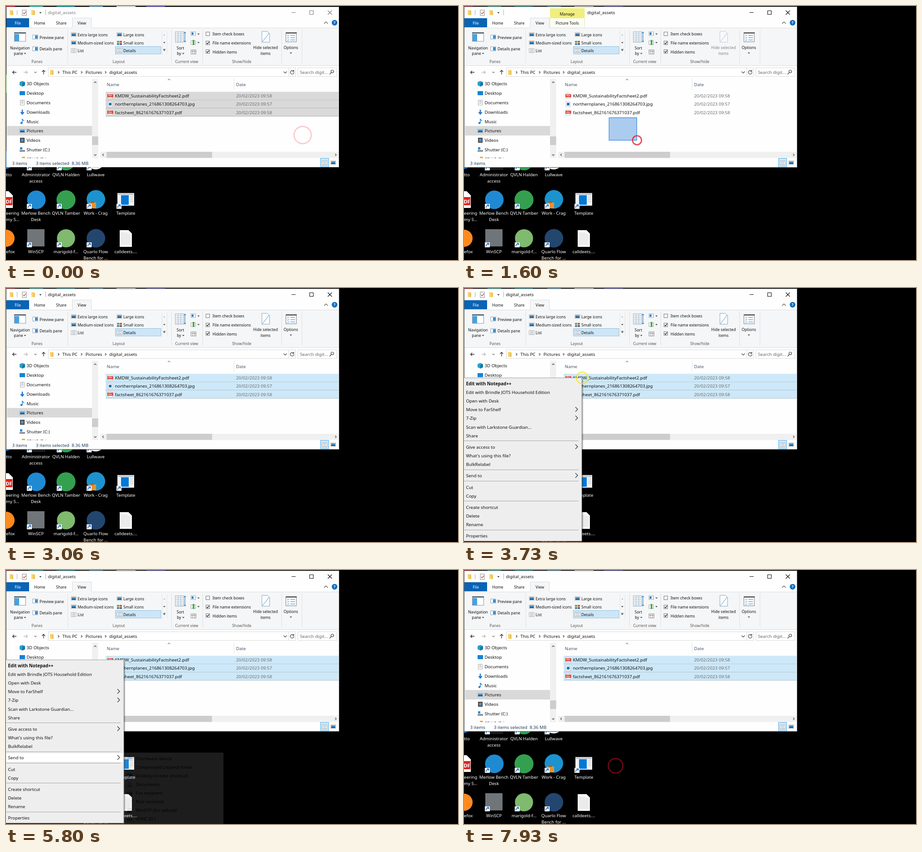
Animation of 998x561 px, one loop 8 s. Source, as an HTML page:

```html
<!DOCTYPE html>
<html lang="en">
<head>
<meta charset="utf-8">
<title>File manager</title>
<style>
html, body { margin: 0; width: 100%; height: 100%; overflow: hidden; background: #000; }
svg { display: block; width: 998px; height: 561px; font-family: "Noto Sans", "Open Sans", sans-serif; }
text { white-space: pre; }
</style>
</head>
<body>
<svg id="stage" viewBox="0 0 998 561" xmlns="http://www.w3.org/2000/svg"></svg>
<script>
const BODY = 9.75, SMALL = 8.6;
const INK = '#111', BLUE = '#0078d7', FOLDER = '#f8d775';

// Markup helpers
const rect = (x, y, w, h, fill, more = '') =>
  `<rect x="${x}" y="${y}" width="${w}" height="${h}" fill="${fill}" ${more}/>`;
const disc = (x, y, r, fill, more = '') => `<circle cx="${x}" cy="${y}" r="${r}" fill="${fill}" ${more}/>`;
const line = (d, stroke = '#555', w = 1) => `<path d="${d}" fill="none" stroke="${stroke}" stroke-width="${w}"/>`;
const shape = (d, fill) => `<path d="${d}" fill="${fill}"/>`;
const text = (x, y, s, size = BODY, fill = INK, more = '') =>
  `<text x="${x}" y="${y}" font-size="${size}" fill="${fill}" ${more}>${s}</text>`;
const mid = (x, y, s, size = BODY, fill = INK, more = '') =>
  text(x, y, s, size, fill, 'text-anchor="middle" ' + more);
const group = (id, s) => `<g id="${id}">${s}</g>`;
const caret = (x, y, fill = '#444') => shape(`M${x - 2.5} ${y - 1.2}h5l-2.5 2.8z`, fill);
const chevron = (x, y, dx, dy, c = '#444', w = 1.2) => dx
  ? line(`M${x - dx / 2} ${y - Math.abs(dx)}l${dx} ${Math.abs(dx)}l${-dx} ${Math.abs(dx)}`, c, w)
  : line(`M${x - Math.abs(dy)} ${y - dy / 2}l${Math.abs(dy)} ${dy}l${Math.abs(dy)} ${-dy}`, c, w);
const folder = (x, y, h = 11) => rect(x, y, 6, h, FOLDER) + rect(x + 4, y + 1.5, 4, h - 1.5, '#eec35a');
const picture = (x, y, w = 11, h = 8) => rect(x, y, w, h, '#fff', 'stroke="#999" stroke-width=".8"') +
  rect(x + 1, y + 1, w - 2, h / 2, '#4d9bdb') + rect(x + 1, y + h / 2, w - 2, h / 2 - 1, '#2d5a78');
const listing = (x, y, w = 11, h = 9) => rect(x, y, w, h, '#fff', 'stroke="#999" stroke-width=".8"') +
  [2, 4.5, 7].map(d => line(`M${x + 2} ${y + d}h${w - 4}`, '#7b8ea0', .8)).join('');
const page = (x, y, w, h, c = '#fff') =>
  shape(`M${x} ${y}h${w * .72}l${w * .28} ${w * .28}v${h - w * .28}h${-w}z`, c);

function desktop() {
  const arrow = (x, y) => rect(x, y, 11, 11, '#fff') +
    line(`M${x + 2.5} ${y + 9}q0 -5 5 -5M${x + 4.5} ${y + 2}h3.8v4`, '#1c63b8', 1.6);
  const label = (x, y, ...rows) => rows.map((s, i) => mid(x, y + 14 * i, s, 9.65, '#fff')).join('');
  const cutLabel = (y, ...rows) => rows.map((s, i) => text(0, y + 14 * i, s, 9.65, '#fff')).join('');
  return rect(0, 0, 998, 561, '#000') +
    rect(0, 0, 20, 2, '#b3202a') + rect(52, 0, 30, 2, '#2aa79b') + rect(112, 0, 40, 2, '#087f8c') +
    rect(184, 0, 30, 2, '#4c8fb5') + rect(244, 0, 42, 2, '#ddd') + rect(310, 0, 41, 2, '#4a44b0') +
    rect(0, 152, 1, 40, '#53b52f') + rect(0, 320, 1, 40, '#1c7fd0') +
    disc(0, 345, 15, '#1477c9') + rect(46, 330, 41, 32, '#1c1e22') + disc(132.5, 343, 20, '#34a04f') +
    disc(198, 341, 20, '#eee') + [46, 112, 178].map(x => arrow(x, 352)).join('') +
    cutLabel(376, 'tto') + label(66, 376, 'Administrator', 'access') + label(132.5, 376, 'QVLN Halden') +
    label(198, 376, 'Lullwave') +
    page(-18, 409, 33, 37) + rect(-18, 422, 32, 18, '#e2231a') +
    text(-7.5, 436, 'PDF', 11, '#fff', 'font-weight="700"') + cutLabel(461, 'eering', 'my S...') +
    disc(67, 428, 20.5, '#1f8ad2') + disc(132.5, 428, 21, '#34a04f') + disc(198.5, 427, 20.5, '#1c93cf') +
    rect(183, 434, 16, 13, '#e8912d') + rect(187, 432, 7, 3, '#a85d14') +
    rect(246, 413, 37, 28, '#f3f3f3') + rect(247, 414, 35, 3, '#b7c3cf') + rect(254, 418, 17, 21, BLUE) +
    [420, 424, 428, 432].map(y => line(`M274 ${y}h7`, '#aaa', .8)).join('') +
    [46, 112, 178, 244].map(x => arrow(x, 437)).join('') +
    label(66, 461, 'Merlow Bench', 'Desk') + label(132.5, 461, 'QVLN Tamber') +
    label(198, 461, 'Work - Crag') + label(264.5, 461, 'Template') +
    disc(0, 513, 19, '#ff8a1e') + cutLabel(546, 'efox') +
    rect(47, 493, 38, 38, '#70757a') + disc(132.5, 513, 20, '#7fba6f') + disc(198.5, 513, 20.5, '#23466f') +
    page(251, 495, 27, 37, '#f6f6f6') +
    Array.from({ length: 9 }, (_, i) => line(`M254 ${502 + i * 3}h${i ? 21 : 14}`, '#ccc', .8)).join('') +
    [46, 112, 178].map(x => arrow(x, 522)).join('') +
    label(66, 546, 'WinSCP') + label(132.5, 546, 'marigold-f...') +
    label(198, 546, 'Quarlo Flow', 'Bench for ...') + label(264.5, 546, 'calldeets....');
}

function titleBar() {
  return folder(8, 9) + line('M24.5 9v11M87.5 8v12', '#aaa') +
    rect(36, 9, 9, 12, '#fff', 'stroke="#888"') + line('M38 15l2 2.5l4 -5', '#d2472b', 1.4) +
    folder(56, 9) + caret(76, 15, '#222') +
    group('manage', rect(190, 5, 76.5, 22, '#f0ee7c') + rect(190, 27, 76.5, 21, '#fdfdf6') +
      line('M190 27v21M266.5 27v21', '#e3e3c8') + mid(228, 20.5, 'Manage', SMALL) +
      mid(228, 41, 'Picture Tools', SMALL)) +
    group('title', text(0, 18, 'digital_assets')) +
    group('buttons', line('M630.5 14.5h9M670.5 10.5h8v8h-8zM710.5 10l9 9M719.5 10l-9 9', '#111', 1.1)) +
    rect(1, 27, 50, 20, '#0a63b5') + mid(26, 40.5, 'File', SMALL, '#fff') +
    mid(74.5, 41, 'Home', SMALL) + mid(122, 41, 'Share', SMALL) +
    rect(146.5, 26.5, 42, 23, '#f5f6f7', 'stroke="#dadbdc"') + mid(167.5, 41, 'View', SMALL) +
    chevron(706.5, 37, 0, -4, '#555') + disc(725.5, 37, 6.2, '#0f6cbf') +
    mid(725.5, 40.3, '?', 9, '#fff', 'font-weight="700"');
}

function ribbon() {
  const item = (x, y, s) => text(x, y, s, SMALL);
  const box = (y, on) => rect(441.5, y, 8, 8, '#fff', 'stroke="#666" stroke-width=".9"') +
    (on ? line(`M443 ${y + 4}l2 2.2l3.5 -4.5`, '#111', 1.3) : '');
  const pane = y => rect(59, y, 11, 9, '#fff', 'stroke="#8ba0b5"') + rect(64, y + 1, 6, 7, '#3d8fd1');
  const cap = (x, s) => mid(x, 125.5, s, SMALL, '#555');
  return rect(1, 48, 734, 83, '#f5f6f7') + line('M1 48.5h145M189 48.5h546M1 131.5h734', '#dadbdc') +
    line('M136.5 52v75M365.5 52v75M434.5 52v75M608.5 52v75M653.5 52v75', '#dfe0e1') +
    rect(18.5, 59, 25, 19, '#fff', 'stroke="#8b97a3"') + rect(19, 62, 10, 16, '#4aa0dc') +
    rect(18, 58, 26, 3, '#5d6b79') +
    mid(31, 95.5, 'Navigation', SMALL) + mid(27.5, 108, 'pane', SMALL) + caret(42, 105) +
    pane(64) + pane(90) + item(74, 72.5, 'Preview pane') + item(74, 98, 'Details pane') +
    rect(241.5, 89.5, 100.5, 16.5, '#cde6f7', 'stroke="#92c0e0"') +
    picture(144, 59) + picture(144, 77) + listing(144, 94) +
    picture(245, 59) + rect(245, 77, 5, 4, '#67a55a') + rect(251, 77, 5, 4, '#cf594a') +
    rect(245, 82, 5, 4, '#4384c4') + rect(251, 82, 5, 4, '#666') + listing(245, 93.5) +
    item(158, 67, 'Extra large icons') + item(158, 84.5, 'Medium-sized icons') + item(158, 101.5, 'List') +
    item(259, 67, 'Large icons') + item(259, 84.5, 'Small icons') + item(259, 101.5, 'Details') +
    line('M344.5 55v52M355.5 55v52', '#e2e3e4') + shape('M347.5 65h4l-2 -2.5z', '#aaa') +
    caret(349.5, 81) + caret(349.5, 98) + line('M347 95.5h5', '#444') +
    rect(374, 57, 18, 23, '#fff', 'stroke="#8fa5b8"') +
    [61, 65, 69, 73, 77].map(y => line(`M375 ${y}h16`, '#9bb3c6')).join('') +
    line('M380 57v23M386 57v23', '#9bb3c6') +
    line('M395 58v21M393 60l2 -2.5l2 2.5M393 77l2 2.5l2 -2.5', '#2779c0', 1.2) +
    mid(385, 95.5, 'Sort', SMALL) + mid(382, 108, 'by', SMALL) + caret(391.5, 105) +
    rect(408.5, 57, 10, 8, '#fff', 'stroke="#8fa5b8"') + rect(410, 58.5, 4, 5, '#2779c0') + caret(425, 62) +
    rect(408.5, 77, 10, 8, '#fff', 'stroke="#8fa5b8"') + rect(412, 75, 4, 11, '#56ab48') + caret(425, 81) +
    rect(408.5, 97, 11, 9, '#fff', 'stroke="#888"') + line('M408 100.5h12M412.5 97v9M416.5 97v9', '#888') +
    box(57.5) + box(77.5, 1) + box(96.5, 1) + item(456, 65, 'Item check boxes') +
    item(456, 85, 'File name extensions') + item(456, 104.5, 'Hidden items') +
    group('hide', page(565, 56, 17, 24, '#fbfcfd') + line('M565 56h12l5 5v19h-17z', '#8ba0b5') +
      line('M566 79l15 -19', '#4a93cc') + mid(573, 95, 'Hide selected', SMALL) + mid(573, 107.5, 'items', SMALL)) +
    rect(618, 59, 23, 20, '#fff', 'stroke="#777"') + rect(618, 58, 24, 3, '#666') +
    [65, 70, 75].map(y => line(`M621 ${y}l1.5 1.5l2.5 -3M628 ${y}h10`, '#2779c0')).join('') +
    mid(629, 95, 'Options', SMALL) + caret(629, 104) +
    cap(68.5, 'Panes') + cap(249, 'Layout') + cap(399, 'Current view') + cap(520.5, 'Show/hide');
}

function addressBar() {
  return line('M23 146.5h-8.5M18 143l-3.5 3.5l3.5 3.5', '#333', 1.3) +
    line('M39 146.5h8.5M44 143l3.5 3.5l-3.5 3.5', '#bbb', 1.3) + chevron(65, 146.5, 0, 2.5, '#777') +
    line('M83 151v-9M79.5 145.5l3.5 -3.5l3.5 3.5', '#333', 1.3) +
    rect(93.5, 136.5, 546, 19, '#fff', 'stroke="#d9d9d9"') + rect(644.5, 136.5, 86, 19, '#fff', 'stroke="#d9d9d9"') +
    folder(97, 141) + [116, 167, 220].map(x => chevron(x, 146.5, 2.5, 0)).join('') +
    text(124.5, 150, 'This PC') + text(175.5, 150, 'Pictures') + text(228, 150, 'digital_assets') +
    chevron(616.5, 146.5, 0, 3.5) + line('M624.5 137v18', '#d9d9d9') +
    line('M634.5 143.5a4 4 0 1 0 1.3 2.5M635.5 141v3.5h-3.5', '#444', 1.2) +
    text(649, 150, 'Search digit...', BODY, '#666') +
    disc(720.5, 144.5, 3, 'none', 'stroke="#444" stroke-width="1.2"') + line('M718 147l-3.5 4', '#444', 1.4);
}

function sidebar() {
  const names = ['3D Objects', 'Desktop', 'Documents', 'Downloads', 'Music', 'Pictures', 'Videos', 'Shutter (C:)', 'SDHC (D:)'];
  const icons = [
    shape('M30 168l6 -2.5l6 2.5v7l-6 3l-6 -3z', '#2d9fc7') + shape('M36 170l6 -2v7l-6 3z', '#1577a8'),
    rect(30, 188, 12, 9, '#1583d6'), listing(31.5, 208, 9, 11),
    line('M36 229v9M32.5 234.5l3.5 4l3.5 -4', '#2477cf', 2.6),
    disc(34, 258.5, 2.2, '#1c7ed0') + line('M36 259v-9l4 4', '#1c7ed0', 1.5),
    picture(30, 272, 12, 8), rect(31, 291, 10, 11, '#444') + rect(33, 293, 6, 7, '#4b8ec9'),
    rect(30, 318, 12, 4, '#8a9299') + rect(31, 312, 5, 5, '#1b8fdc'), rect(35, 333, 7, 6, '#e5ae37')];
  return '<clipPath id="pane"><rect x="1" y="160" width="189" height="176"/></clipPath><g clip-path="url(#pane)">' +
    rect(2, 265, 188, 21, '#d9d9d9') +
    names.map((s, i) => icons[i] + text(45.5, 175.2 + 20.85 * i, s)).join('') + '</g>' +
    rect(190, 161, 13.5, 175, '#f0f0f0') + rect(190, 288, 13.5, 19, '#cdcdcd') +
    chevron(197, 168.5, 0, -2.5) + chevron(197, 329, 0, 2.5);
}

const FILES = [
  ['KMDW_SustainabilityFactsheet2.pdf', '09:58'],
  ['northernplanes_216861308264703.jpg', '09:57'],
  ['factsheet_862161676371037.pdf', '09:58']];
const rowTop = i => 189.5 + 18.2 * i;

function fileList() {
  const head = '#44566c';
  return text(222.5, 176.5, 'Name', BODY, head) + text(508, 176.5, 'Date', BODY, head) +
    line('M503.5 160v25', '#e3e3e3') + chevron(360, 162.5, 0, -2.5, '#888') +
    FILES.map(([name, at], i) => {
      const y = rowTop(i), pdf = name.endsWith('pdf');
      return group('row' + i, rect(220, y, 514.5, 18.2, 'currentColor') +
          rect(220, y + 17.4, 514.5, .8, '#000', 'opacity=".22"')) +
        page(225, y + 3, 10, 12, '#fff') + line(`M225 ${y + 3}h7l3 3v9h-10z`, '#aaa', .7) +
        (pdf ? rect(224, y + 5.5, 12.5, 6.5, '#d8261c') + mid(230.2, y + 10.7, 'PDF', 5, '#fff', 'font-weight="700"')
             : rect(227, y + 6, 6, 6, '#2073bd')) +
        text(240.5, y + 12.6, name) + text(508, y + 12.6, '20/02/2023 ' + at, BODY, '#6d6d6d');
    }).join('') +
    rect(208, 322, 526, 13.5, '#f0f0f0') + rect(222, 322, 233, 13.5, '#cdcdcd') +
    chevron(214.5, 328.7, -2.5, 0) + chevron(728, 328.7, 2.5, 0) +
    text(13.5, 350.5, '3 items', BODY, '#1e395b') + text(66, 350.5, '', BODY, '#1e395b', 'id="status"') +
    rect(694.5, 336.5, 18, 18.5, '#cce8ff', 'stroke="#5ab0e6"') + listing(698, 342, 11, 9) + picture(717, 342);
}

const MENU = [
  [211.5, 'Edit with Notepad++'], [230.5, 'Edit with Brindle JOTS Household Edition'], [249.5, 'Open with Desk'],
  [268.5, 'Move to FarShelf', 1], [287.5, '7-Zip', 1], [307, 'Scan with Larkstone Guardian...'], [326, 'Share'],
  [351, 'Give access to', 1], [370, "What's using this file?"], [389, 'BulkRelabel'], [414.5, 'Send to', 1],
  [440, 'Cut'], [459, 'Copy'], [484, 'Create shortcut'], [503, 'Delete'], [522, 'Rename'], [547.5, 'Properties']];
const SEND = ['Shortwave device', 'Compressed (zipped) folder', 'Desktop (create shortcut)', 'Documents',
  'Fax recipient', 'Mail recipient', 'WinSCP (for upload)', 'SDHC (D:)'];
const sendY = i => 416 + 19.1 * i;

function menus() {
  const icons = [
    disc(273, 416, 5.5, '#0a78d4'), folder(269, 429.5, 11) + rect(272, 430, 1.5, 10, '#8a6d1e'),
    rect(267, 450, 12, 9, '#1583d6'), rect(268.5, 468, 8, 8, '#9cc9e6') + rect(267, 476, 12, 3, '#7b93a5'),
    rect(267, 490, 12, 7, '#70777c') + rect(270, 487, 7, 4, '#bcd'),
    rect(267, 508, 12, 8, '#fff', 'stroke="#bbb" stroke-width=".8"') + rect(275, 509, 3, 3, '#4a90d0'),
    rect(268, 526, 10, 10, '#70757a'), rect(267, 549, 12, 5, '#8a9299') + rect(272, 545, 6, 6, '#e5ae37')];
  const sub = rect(258, 403.5, 222, 160, '#eee', 'stroke="#aaa"') +
    rect(259, 0, 220.5, 19, '#fff', 'id="subHover"') +
    SEND.map((s, i) => icons[i] + text(286.5, sendY(i) + 3.6, s)).join('');
  const main = rect(260, 202, 3, 358, '#000', 'opacity=".3"') +
    rect(-1, 198.5, 261, 360.5, '#eee', 'stroke="#a0a0a0"') + rect(1, 0, 258, 19, '#fff', 'id="hover"') +
    [337.5, 401.5, 426.5, 470.5, 534.5].map(y => line(`M0 ${y}h253`, '#a5a5a5')).join('') +
    MENU.map(([y, s, more], i) => text(4.5, y + 3.5, s, i ? BODY : 9.85, INK, i ? '' : 'font-weight="700"') +
      (more ? line(`M246 ${y - 5.5}l5 5l-5 5`, '#222', 1.1) : '')).join('');
  return group('menu', main) + group('submenu', sub);
}

// Click ripples: start time, centre, colour
const RED = '#e8192c';
const CLICKS = [[-1085, 655, 285, RED], [230, 655, 285, RED], [1093, 382, 296.5, RED],
  [3060, 261, 198.5, '#f2e600'], [7060, 334.7, 432.5, RED]];
// Menu pointer: time, item
const HOVER = [[3930, 0], [4000, 1], [4130, 2], [4200, 3], [4260, 4], [4600, 5], [4730, 6], [4860, 7],
  [5260, 8], [5330, 9], [5400, 10]];
const SUB_HOVER = [[6330, 0], [6460, 1]];

const stage = document.getElementById('stage');
stage.innerHTML = desktop() +
  group('window', rect(1, 2, 734, 354, '#fefefe') + titleBar() + ribbon() + addressBar() + sidebar() + fileList()) +
  rect(.5, 1.5, 735, 355, 'none', 'id="frame" stroke="#555"') +
  rect(0, 0, 0, 0, '#06c', 'id="lasso" fill-opacity=".33" stroke="#1a74d4"') + menus() +
  CLICKS.map(([, x, y, c], i) => disc(x, y, 0, 'none', `id="ring${i}" stroke="${c}" stroke-width="2.8"`)).join('');

const $ = id => document.getElementById(id);
const set = (id, attrs) => { for (const k in attrs) $(id).setAttribute(k, attrs[k]); };
const show = (id, on) => set(id, { visibility: on ? 'visible' : 'hidden' });
const clamp = v => Math.max(0, Math.min(1, v));
const latest = (list, t) => list.reduce((hit, [at, v]) => t >= at ? v : hit, -1);

function drawRing(i, t) {
  const p = (t - CLICKS[i][0]) / 1340, on = p > 0 && p < 1;
  const k = on ? 1 - (1 - p) ** 1.3 : 0;
  set('ring' + i, { r: 21.5 * k, opacity: on ? 1 - k * k : 0 });
}

// Returns the top of the selection rectangle
function drawLasso(t) {
  const e = 1 - (1 - clamp((t - 1100) / 1500)) ** 1.7;
  const x = 382 - 123 * e, y = 296.5 - 100 * e;
  show('lasso', t > 1100 && t < 2725);
  set('lasso', { x: x - .5, y, width: 382 - x, height: 296.5 - y });
  return t > 1100 ? y : 999;
}

function draw(t) {
  const active = t >= 195, top = drawLasso(t);
  const picked = [201, 222, 240].map(y => !active || top < y);
  const count = picked.filter(Boolean).length;
  const manage = t >= 395 && t < 1860;

  picked.forEach((on, i) => { show('row' + i, on); set('row' + i, { color: active ? '#cde8f8' : '#d9d9d9' }); });
  $('status').textContent = ['', '1 item selected  2.61 MB', '2 items selected  2.93 MB', '3 items selected  8.36 MB'][count];
  show('manage', manage);
  set('title', { transform: `translate(${manage ? 272 : 92.5} 0)`, opacity: active ? 1 : .55 });
  set('buttons', { opacity: active ? 1 : .55 });
  set('frame', { opacity: active ? 1 : .2 });
  set('hide', { opacity: count ? 1 : .5 });

  const closing = 1 - clamp((t - 7190) / 140);
  set('menu', { opacity: Math.min(clamp((t - 3330) / 200), closing) });
  set('submenu', { opacity: t < 5790 ? 0 : Math.min(clamp(.12 + (t - 5800) / 227), closing) });
  const h = latest(HOVER, t), s = latest(SUB_HOVER, t);
  show('hover', h >= 0);
  if (h >= 0) set('hover', { y: MENU[h][0] - 9.5 });
  show('subHover', s >= 0);
  if (s >= 0) set('subHover', { y: sendY(s) - 9.5 });
  CLICKS.forEach((_, i) => drawRing(i, t));
}

// The picture advances 15 times a second
const STEP = 1000 / 15;
const start = performance.now();
function tick() {
  const t = (performance.now() - start) % 8000;
  draw(Math.floor((t + 7) / STEP) * STEP % 8000);
  requestAnimationFrame(tick);
}
tick();
</script>
</body>
</html>
```
